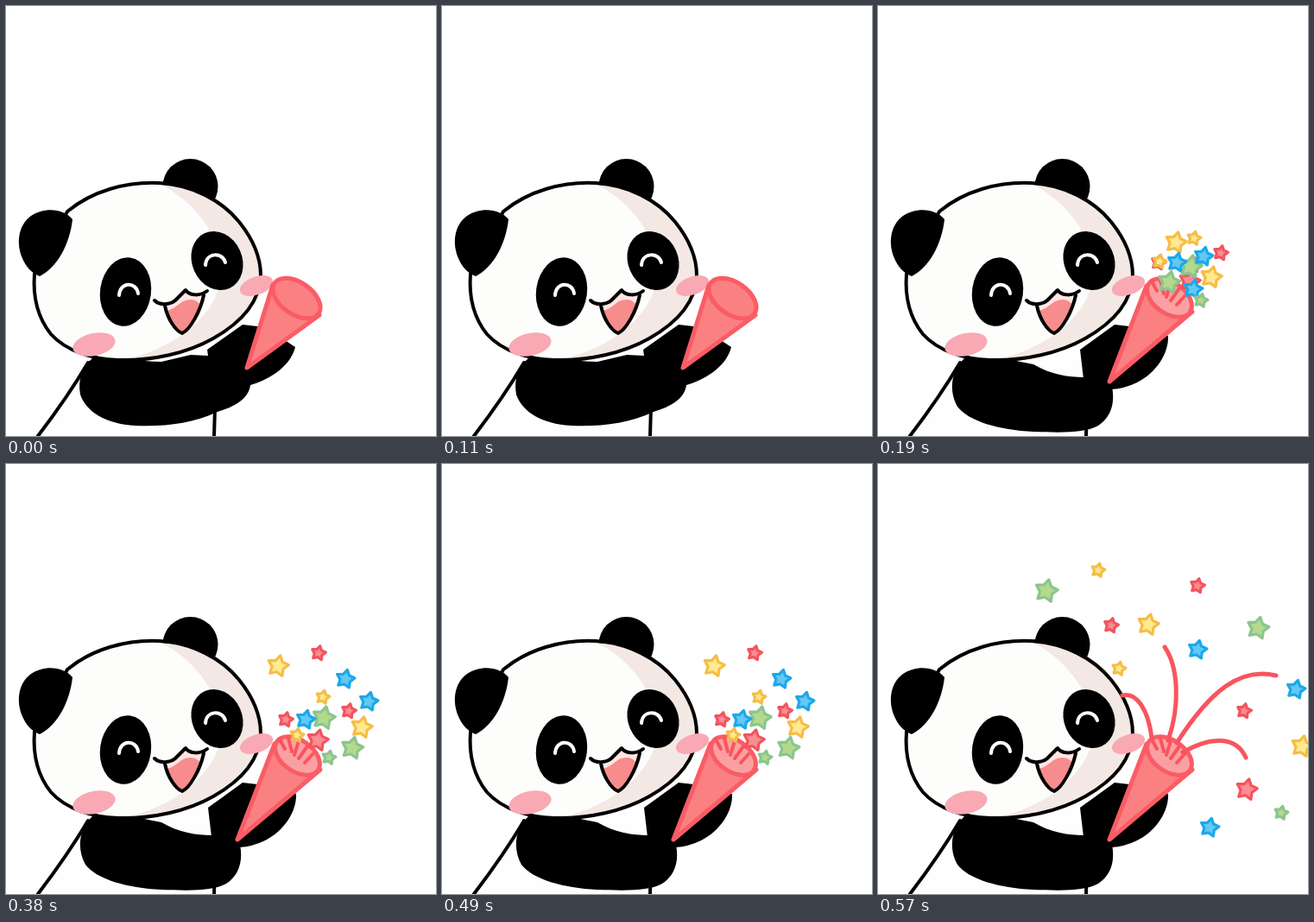
Animation, 498 px wide and 498 px high, one loop 0.76 s. Source, as an HTML page:

```html
<!DOCTYPE html>
<html lang="en">
<head>
<meta charset="utf-8">
<title>Party panda</title>
<style>
html, body { margin: 0; width: 100%; height: 100%; overflow: hidden; background: #fff }
svg { display: block; width: 100%; height: 100% }
.line { fill: none; stroke: #000; stroke-width: 4; stroke-linecap: round; stroke-linejoin: round }
.cone { fill: #fb8082; stroke: #fa5c66; stroke-width: 5; stroke-linejoin: round }
.ribbon { fill: none; stroke: #f9545e; stroke-width: 5; stroke-linecap: round }
#stars path { stroke-width: 3.2; stroke-linejoin: round }
</style>
</head>
<body>
<svg viewBox="0 0 498 498">
  <path d="M95 413Q72 452 37 498H241L242 440L236 390Z" fill="#fdfefd"/>
  <path class="line" d="M95 413Q72 452 37 498M242 465L241 498"/>

  <g id="armsReady">
    <path d="M100 408C130 403 150 412 180 412L214 404L234 405L233 398L274 369L300 372L335 395C330 415 310 431 283 439C281 455 265 464 245 470C215 484 185 487 150 486C115 484 93 470 86 450C83 432 88 418 100 408Z"/>
  </g>
  <g id="armsPopped">
    <path d="M234 398L274 369L300 372L336 382C337 402 322 425 300 436Q286 443 270 444L238 432Z"/>
    <path d="M100 408C130 403 160 411 180 415C200 427 222 430 238 430C256 430 266 433 271 441C275 461 269 477 255 486C240 495 210 494 180 493C140 491 105 481 92 464C82 446 84 423 100 408Z"/>
  </g>

  <ellipse cx="213.500" cy="209" rx="32" ry="32"/>
  <path id="head" fill="#fdfefc" d="M71 238C100 214 140 203 178 205C215 207 250 225 270 250C286 270 295 290 295 312C294 345 270 368 240 385C210 402 170 411 130 410C100 409 70 400 52 380C36 360 31 335 33 310Z"/>
  <path fill="#f3e8e4" d="M178 206C215 207 250 225 270 250C286 270 295 290 295 312C294 345 270 368 240 385C210 402 170 411 135 410C205 395 250 350 250 305C248 264 216 225 178 206Z"/>
  <use href="#head" class="line" style="fill-opacity:0"/>
  <path d="M77 247C66 234 44 233 29 243C14 254 12 274 18 290C23 303 30 309 39 313C60 302 74 275 77 247Z"/>

  <ellipse cx="138.500" cy="331" rx="29.500" ry="40" transform="rotate(8 138.500 331)"/>
  <ellipse cx="244.500" cy="295" rx="29" ry="35" transform="rotate(-24 244.500 295)"/>
  <path d="M131 335C132 319 151 319 153 333M231 300C232 285 251 285 254 297" fill="none" stroke="#fff" stroke-width="4" stroke-linecap="round"/>
  <path d="M184 346L208 330L229 335C226 352 215 374 205 379C196 376 187 362 184 346Z" fill="#fde5e3"/>
  <path d="M187 353C194 351 199 346 205 342C212 339 220 339 224 345C221 358 212 374 204 378C196 374 190 363 187 353Z" fill="#f78c8c"/>
  <path class="line" d="M172 341C178 347 190 346 196 341L208 329C213 336 225 336 233 330M184 347C187 362 196 376 204 379C213 375 225 354 229 335"/>
  <ellipse cx="102" cy="392" rx="25" ry="13" fill="#f9a9b3" transform="rotate(-12 102 392)"/>
  <ellipse cx="290" cy="324" rx="20" ry="10.500" fill="#f9a9b3" transform="rotate(-20 290 324)"/>

  <g id="coneReady" class="cone">
    <path d="M309 323L279 419L363 358Z"/>
    <ellipse cx="336.500" cy="338.500" rx="31" ry="18.500" transform="rotate(35 336.500 338.500)"/>
  </g>
  <g id="conePopped">
    <path class="cone" d="M311 324L268 435L364 354Z"/>
    <ellipse class="cone" cx="337.500" cy="338" rx="29" ry="18" transform="rotate(35 337.500 338)" style="fill:#fba0a2"/>
    <path class="ribbon" style="stroke-width:4" d="M317 319L323 330M327 318L331 333M339 321L334 337M349 327L339 341M355 336L346 346"/>
  </g>
  <path id="ribbons" class="ribbon" d="M283 268C300 264 313 285 317 317M332 212C348 235 350 280 336 320M461 245C420 235 385 262 346 323M426 340C415 315 385 315 353 334"/>
  <g id="stars"></g>
</svg>
<script>
const STEP = 190, COUNT = 4;
const COLORS = {
  green: ['#b4d98c', '#8bc58f'],
  yellow: ['#ffe991', '#f6bd45'],
  red: ['#f98d92', '#f2545f'],
  blue: ['#62c8f5', '#1ca8e8']
};
// color, radius, then x, y after each of the three bursts
const STARS = [
  ['red', 13, 361, 319, 361, 320, 427, 377],
  ['red', 9, 325, 297, 324, 296, 270, 187],
  ['red', 9, 397, 286, 397, 286, 424, 286],
  ['red', 9, 366, 300, 362, 219, 370, 141],
  ['green', 14, 362, 302, 368, 294, 195, 147],
  ['yellow', 13, 345, 274, 315, 234, 313, 186],
  ['yellow', 8.5, 366, 269, 367, 270, 255, 123],
  ['yellow', 8.5, 326, 296, 337, 314, 279, 237],
  ['blue', 11.5, 346, 297, 347, 296, 384, 421],
  ['blue', 11.5, 377, 290, 393, 249, 370, 215],
  ['yellow', 13, 386, 314, 412, 305, 491, 327],
  ['green', 13.5, 337, 320, 401, 329, 440, 190],
  ['blue', 11.5, 365, 328, 420, 275, 484, 261],
  ['green', 8.5, 374, 341, 374, 340, 467, 404]
];
const get = id => document.getElementById(id);

function starPath(size) {
  const points = [];
  for (let i = 0; i < 10; i++) {
    const r = (size - 0.6) * (i % 2 ? 0.56 : 1);
    const a = i * Math.PI / 5 - Math.PI / 2 + 0.22;
    points.push((r * Math.cos(a)).toFixed(1) + ' ' + (r * Math.sin(a)).toFixed(1));
  }
  return 'M' + points.join('L') + 'Z';
}

const stars = STARS.map(([color, size, ...spots]) => {
  const el = document.createElementNS('http://www.w3.org/2000/svg', 'path');
  el.setAttribute('d', starPath(size));
  el.setAttribute('fill', COLORS[color][0]);
  el.setAttribute('stroke', COLORS[color][1]);
  get('stars').append(el);
  return { el, spots };
});

function show(id, on) {
  get(id).style.display = on ? '' : 'none';
}

function draw() {
  const pose = Math.floor(performance.now() / STEP) % COUNT;
  const popped = pose > 0;
  show('armsReady', !popped);
  show('coneReady', !popped);
  show('armsPopped', popped);
  show('conePopped', popped);
  show('stars', popped);
  show('ribbons', pose === 3);
  if (popped) {
    for (const { el, spots } of stars) {
      const i = (pose - 1) * 2;
      el.setAttribute('transform', `translate(${spots[i]} ${spots[i + 1]})`);
    }
  }
  requestAnimationFrame(draw);
}
draw();
</script>
</body>
</html>
```
